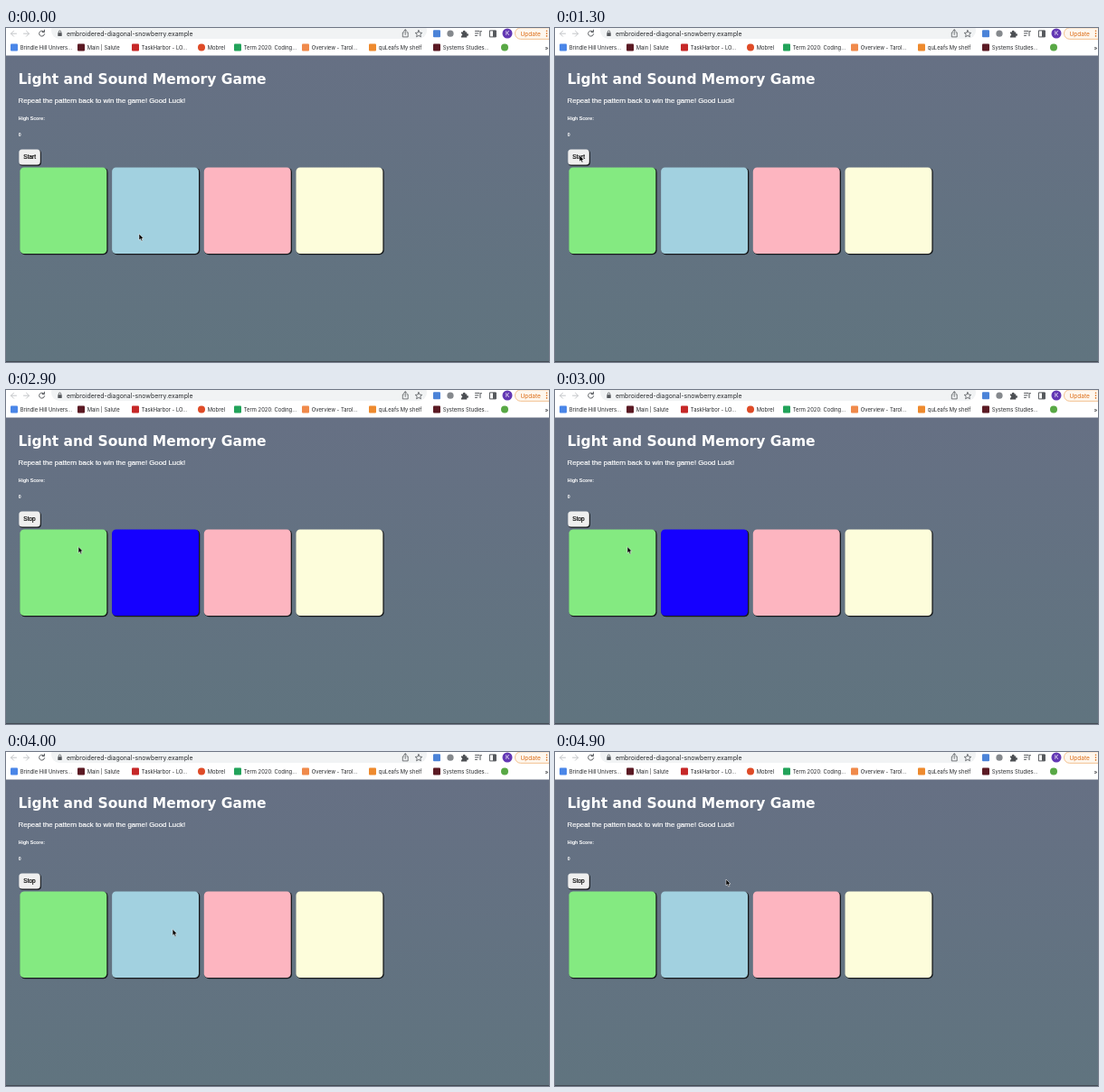
An HTML page that plays this animation: 600x370 px, repeating every 5 s.

```html
<!DOCTYPE html>
<html lang="en">
<head>
<meta charset="utf-8">
<title>Memory Game</title>
<style>
  html, body { margin: 0; width: 100%; height: 100%; overflow: hidden; background: #647080; }
  svg { display: block; width: 600px; height: 370px; }
  text { font-family: "Liberation Sans", Arial, sans-serif; white-space: pre; }
  .ui text { font-family: Inter, Roboto, sans-serif; fill: #26282b; }
  .line { fill: none; stroke: #55585c; stroke-width: 1; stroke-linecap: round; stroke-linejoin: round; }
  .page text { fill: #fff; }
  .page .h1 { font: bold 15.5px "DejaVu Sans", Verdana, sans-serif; }
  .page .p { font-size: 7.81px; stroke: #fff; stroke-width: .2; }
  .page .h6 { font-size: 5.23px; font-weight: bold; }
  .page .btn { font-size: 6.5px; fill: #000; stroke: #000; stroke-width: .2; }
</style>
</head>
<body>
<svg viewBox="0 0 600 370">
  <defs>
    <linearGradient id="sky" x1="0" y1="0" x2="0" y2="1">
      <stop offset="0" stop-color="#667084"/>
      <stop offset="1" stop-color="#60747f"/>
    </linearGradient>
  </defs>
  <rect y="30" width="600" height="340" fill="url(#sky)"/>
  <rect y="369" width="600" height="1" fill="#434b53"/>

  <g class="ui">
    <rect width="600" height="30.5" fill="#fff"/>
    <rect x="50" y="-6" width="415" height="18" rx="9" fill="#f1f3f4"/>
    <g transform="translate(0 .4)">
      <g class="line">
        <path d="M5.500 5.800H11.500M8.500 2.800L5.500 5.800L8.500 8.800M19.500 5.800H25.500M22.500 2.800L25.500 5.800L22.500 8.800" stroke="#c3c5c8"/>
        <path d="M42 3.800A3 3 0 1 0 42.600 6.400M42.400 1.800V4.200H40"/>
        <path d="M58.300 5V3.800a1.200 1.200 0 0 1 2.400 0V5" stroke-width=".8"/>
        <path d="M439.500 4.500H438.300V9.500H444.200V4.500H443M441.200 7V1.500M439.500 3L441.200 1.400L443 3" stroke-width=".8"/>
        <path d="M456 2.200L457.100 4.700L459.800 5L457.800 6.800L458.400 9.400L456 8L453.600 9.400L454.200 6.800L452.200 5L454.900 4.700Z" stroke-width=".8"/>
        <path d="M518.500 3H523M518.500 5.500H522M518.500 8H520.500M524 8.300V3.300H525.500"/>
        <rect x="534.800" y="2.500" width="6.600" height="7"/>
      </g>
      <rect x="57.300" y="4.800" width="4.400" height="3.800" rx=".6" fill="#55585c"/>
      <rect x="538" y="2.500" width="3.400" height="7" fill="#55585c"/>
      <rect x="472" y="1.800" width="8" height="8" rx="1" fill="#4b83d8"/>
      <circle cx="491" cy="5.800" r="3.600" fill="#85898d"/>
      <path d="M503 4H505A1.300 1.300 0 1 1 507.500 4H509.300V6A1.200 1.200 0 1 1 509.300 8.200V10H503V8.200A1.200 1.200 0 0 0 503 5.800Z" fill="#4c4f53"/>
    </g>
    <circle cx="554" cy="6" r="5.500" fill="#6338b4"/>
    <text x="554" y="8.400" font-size="6.300" text-anchor="middle" style="fill:#fff">K</text>
    <rect x="562.500" y="-.2" width="48" height="12.500" rx="6.200" fill="#fef7ee" stroke="#f0b274" stroke-width=".8"/>
    <text x="568.500" y="8.700" font-size="6.500" style="fill:#dc6b14">Update</text>
    <g fill="#dc6b14">
      <circle cx="597.500" cy="3.300" r=".8"/><circle cx="597.500" cy="6.100" r=".8"/><circle cx="597.500" cy="8.900" r=".8"/>
    </g>
    <text x="67" y="8.800" font-size="6.900">embroidered-diagonal-snowberry.example</text>
    <g id="marks" font-size="5.850"></g>
    <text x="595.500" y="23.700" font-size="6.500">»</text>
  </g>

  <g class="page">
    <text class="h1" x="13.400" y="62">Light and Sound Memory Game</text>
    <text class="p" x="13.500" y="83">Repeat the pattern back to win the game! Good Luck!</text>
    <text class="h6" x="13.700" y="102">High Score:</text>
    <text class="h6" x="13.700" y="120">0</text>
    <rect x="14.700" y="134.900" width="24.200" height="17.800" rx="3.800" fill="#17191c"/>
    <rect x="14.300" y="134.500" width="23.500" height="17.100" rx="3.500" fill="#efefef"/>
    <text class="btn" id="label" x="19.300" y="145.300">Start</text>
    <g id="tiles"></g>
  </g>

  <path id="arrow" d="M0 0V7L1.600 5.600L2.700 8.100L3.900 7.600L2.900 5.100H5Z" fill="#000" stroke="#fff" stroke-opacity=".85" stroke-width=".6"/>
</svg>

<script>
const $ = id => document.getElementById(id);

function add(parent, tag, attrs, text = "") {
  const el = document.createElementNS("http://www.w3.org/2000/svg", tag);
  for (const key in attrs) el.setAttribute(key, attrs[key]);
  el.textContent = text;
  return parent.appendChild(el);
}

// icon x, icon colour, round icon, label
const bookmarks = [
  [5, "#4a86e8", 0, "Brindle Hill Univers..."],
  [79, "#5b1a24", 0, "Main | Salute"],
  [139, "#c62828", 0, "TaskHarbor - LO..."],
  [212, "#df4b27", 1, "Mobrel"],
  [252, "#22a35a", 0, "Term 2020: Coding..."],
  [327, "#f08a4b", 0, "Overview - Tarol..."],
  [401, "#ee8a2e", 0, "quLeafs My shelf"],
  [472, "#5b1a24", 0, "Systems Studies..."],
  [547, "#58a845", 1, ""]
];
for (const [x, fill, round, name] of bookmarks) {
  add($("marks"), "rect", { x, y: 17.6, width: 8, height: 8, rx: round ? 4 : 1, fill });
  add($("marks"), "text", { x: x + 10.8, y: 23.8 }, name);
}

const IDLE = "#a2d1e0", GLOW = "#1500ff";
const tiles = ["#84ea81", IDLE, "#fdb5c0", "#fdfddb"].map((fill, i) => {
  const x = 15.4 + i * 101.7;
  add($("tiles"), "rect", { x: x + .4, y: 154.9, width: 96.8, height: 96.4, rx: 5, fill: "#17191c" });
  return add($("tiles"), "rect", { x, y: 154.5, width: 95.9, height: 95.5, rx: 4.5, fill });
});

const LOOP = 5000, STEP = 100;
const START = 1900, LIT = 2900, UNLIT = 4000;

// time, x, y of the pointer tip
const path = [
  [0, 147, 228], [200, 147, 228], [1200, 27, 141], [1800, 27, 141],
  [2200, 35, 147], [2500, 80, 173.6], [3000, 80, 173.6], [3600, 182.6, 199],
  [3900, 182.6, 198], [4300, 192, 187], [4900, 189, 141]
];

function pointer(t) {
  const i = path.findIndex(k => k[0] > t);
  if (i < 0) return path[path.length - 1].slice(1);
  const [t0, x0, y0] = path[i - 1], [t1, x1, y1] = path[i];
  const u = (t - t0) / (t1 - t0), e = u * u * (3 - 2 * u);
  return [x0 + (x1 - x0) * e, y0 + (y1 - y0) * e];
}

function draw(t) {
  const [x, y] = pointer(t);
  $("arrow").setAttribute("transform", `translate(${x} ${y})`);
  $("label").textContent = t < START ? "Start" : "Stop";
  tiles[1].setAttribute("fill", t >= LIT && t < UNLIT ? GLOW : IDLE);
}

const begin = performance.now();
function tick() {
  const t = (performance.now() - begin) % LOOP;
  draw(Math.floor(t / STEP) * STEP);
  requestAnimationFrame(tick);
}
draw(0);
requestAnimationFrame(tick);
</script>
</body>
</html>
```
